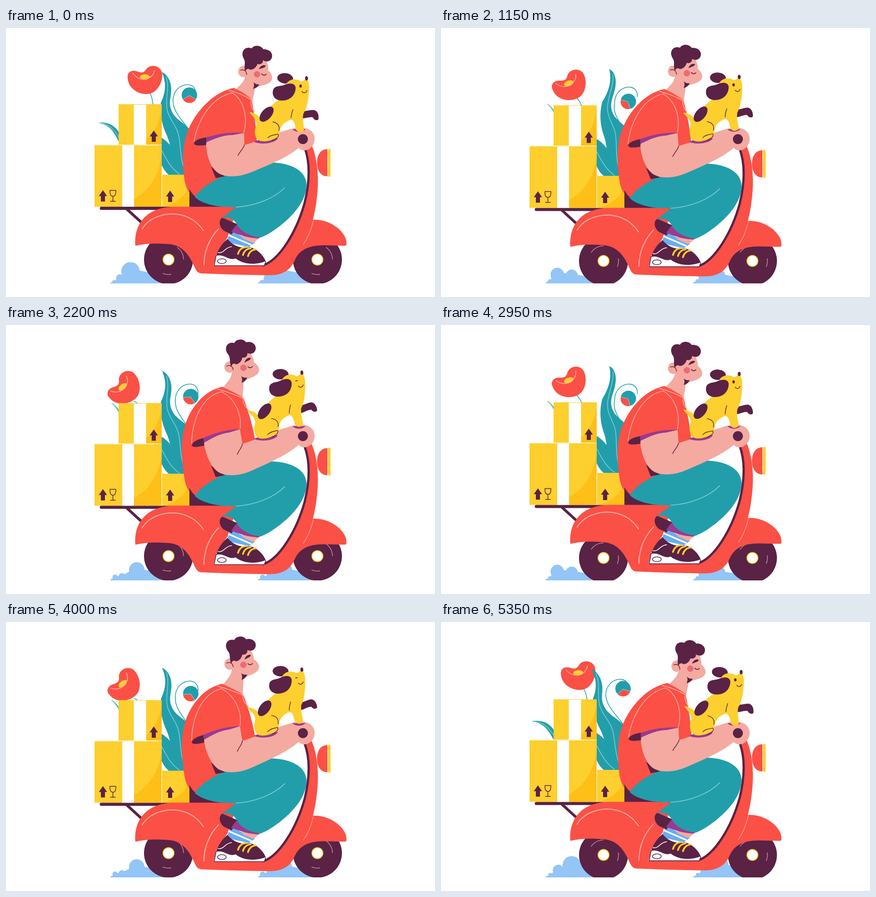
An HTML page with a canvas for the animation above (5.4 s loop, 945x593 px).

```html
<!DOCTYPE html>
<html lang="en">
<head>
<meta charset="utf-8">
<title>Scooter ride</title>
<style>
html, body { margin: 0; width: 100%; height: 100%; overflow: hidden; background: #fff; }
canvas { display: block; width: 945px; height: 593px; }
</style>
</head>
<body>
<canvas id="stage" width="945" height="593"></canvas>
<script>
const ctx = document.getElementById('stage').getContext('2d');
const RED = '#fb5046', PLUM = '#5a2245', SKIN = '#f4aaa0', YELLOW = '#fdcf2f', AMBER = '#fdbf18',
  TEAL = '#229eab', MAGENTA = '#9b3a8e', SKY = '#93c5f7', PINK = '#ffb3a5', AQUA = '#84cbd0', WHITE = '#fff';
const TAU = Math.PI * 2, STEP = 50, GROUND = 563;
const clamp = (v, lo = 0, hi = 1) => Math.max(lo, Math.min(hi, v));
const still = (x, y) => [x, y];

// Builds a path from absolute M, L, C, Q, Z commands, bending every point with warp.
function trace(d, warp = still) {
  ctx.beginPath();
  for (const part of d.match(/[MLCQZ][^MLCQZ]*/g)) {
    const n = (part.slice(1).match(/-?[\d.]+/g) || []).map(Number);
    const p = [];
    for (let i = 0; i < n.length; i += 2) p.push(...warp(n[i], n[i + 1]));
    switch (part[0]) {
      case 'M': ctx.moveTo(...p); break;
      case 'L': ctx.lineTo(...p); break;
      case 'C': ctx.bezierCurveTo(...p); break;
      case 'Q': ctx.quadraticCurveTo(...p); break;
      default: ctx.closePath();
    }
  }
}
function fill(color, d, warp) {
  trace(d, warp);
  ctx.fillStyle = color;
  ctx.fill();
}
function line(color, width, d, warp) {
  trace(d, warp);
  ctx.strokeStyle = color;
  ctx.lineWidth = width;
  ctx.stroke();
}
function oval(color, x, y, rx, ry = rx, turn = 0) {
  ctx.beginPath();
  ctx.ellipse(x, y, rx, ry, turn, 0, TAU);
  ctx.fillStyle = color;
  ctx.fill();
}
function rect(color, x, y, w, h) {
  ctx.fillStyle = color;
  ctx.fillRect(x, y, w, h);
}
function group(dx, dy, draw) {
  ctx.save();
  ctx.translate(dx, dy);
  draw();
  ctx.restore();
}
function spin(x, y, deg, draw) {
  ctx.save();
  ctx.translate(x, y);
  ctx.rotate(deg * Math.PI / 180);
  ctx.translate(-x, -y);
  draw();
  ctx.restore();
}

// Puffs: moment of leaving the wheel within 900 ms, and size.
const PUFFS = [[105, 1.35], [250, 0.65], [400, 0.85], [560, 1], [720, 1], [850, 1]];

function dust(t, dx) {
  const list = [];
  for (const [born, size] of PUFFS) {
    const age = ((t - born + 200) % 900 + 900) % 900 - 200;
    if (age > 560) continue;
    const h = age < 0 ? 47 * Math.exp(age / 150) : age < 50 ? 47 : 47 * Math.exp(-(age - 50) / 155);
    list.push({ x: 226 + 62 * Math.exp(-age / 200), h: h * size });
  }
  list.sort((a, b) => a.x - b.x);
  group(dx, 0, () => {
    ctx.beginPath();
    ctx.rect(150, 400, 250, GROUND - 400);
    ctx.clip();
    ctx.beginPath();
    ctx.moveTo(229, GROUND);
    for (const p of list) ctx.lineTo(p.x, GROUND - p.h * 0.68);
    ctx.lineTo(352, GROUND);
    ctx.fillStyle = SKY;
    ctx.fill();
    for (const p of list) {
      const r = Math.max(1, p.h * 0.43);
      oval(SKY, p.x, GROUND - p.h + r, r);
      rect(SKY, p.x - r * 0.9, GROUND - p.h + r * 1.3, r * 1.8, p.h);
    }
  });
}

function wheel(x, y, deg) {
  ctx.save();
  ctx.beginPath();
  ctx.rect(x - 60, 400, 120, GROUND - 400);
  ctx.clip();
  oval(PLUM, x, y, 54);
  spin(x, y, deg, () => {
    ctx.strokeStyle = '#c58593';
    ctx.lineWidth = 1.6;
    for (const [a, b] of [[-0.95, -0.02], [1.42, 1.95]]) {
      ctx.beginPath();
      ctx.arc(x, y, 33, a, b);
      ctx.stroke();
    }
  });
  oval(YELLOW, x, y, 13);
  oval(WHITE, x, y, 11);
  ctx.restore();
}

function poppy(f) {
  const dx = -43 * f, dy = 21 * f;
  line(TEAL, 1.6, `M${316 + dx * 0.75} ${142 + dy} Q${325 + dx * 0.6} ${154 + dy * 0.8} ${326 + dx * 0.4} 200`);
  group(dx, dy, () => spin(307, 115, -37 * f, () => {
    fill(RED, 'M268 110 C266 97 277 92 287 95 C296 98 302 101 308 92 C316 79 337 81 343 96 C348 113 337 136 322 143 C303 152 269 138 268 110Z');
    oval(YELLOW, 306, 108, 11, 6);
    fill(RED, 'M280 100 C288 113 300 114 308 114 C318 112 324 105 327 94 L335 120 L300 133 L278 118Z');
    line(PINK, 1.6, 'M279 99 C288 112 299 114 308 113 C318 110 325 104 327 94');
  }));
}

function plants(f, th) {
  const s = Math.sin(th), c = Math.cos(th);
  const q = (6.5 * c - 6.5 + 39 * s) / 39;
  const k = (11.5 - 11.5 * c + 16.7 * s) / 28;

  const side = (x, y) => {
    const w = Math.sqrt(clamp((258 - x) / 54));
    return [x + 27 * k * w, y - 42 * k * w];
  };
  fill(TEAL, 'M204 209 C226 206 242 217 250 232 L254 262 C247 250 243 236 232 224 C224 215 214 211 204 209Z', side);
  line(AQUA, 1.5, 'M212 210 C230 214 240 226 250 244', side);

  poppy(f);

  // Bud on its curled stem
  const stem = (x, y) => {
    const w = clamp((230 - y) / 70);
    return [x + 14.7 * s * w, y + 3 * s * w];
  };
  line(TEAL, 1.6, 'M404 226 C386 200 368 184 368 160 C368 138 384 124 402 125 C412 126 419 134 418 146', stem);
  group(8.8 * s, 1 - c + 10.4 * s, () => spin(404, 148, 36 * s + 7 * (1 - c), () => {
    oval(TEAL, 404, 148, 17);
    fill(RED, 'M404 149 L418 157 C412 168 396 168 390 157Z');
    line(AQUA, 1.2, 'M390 157 L404 149 L418 157');
  }));

  // Tall leaf and the low one beside it
  const tall = (x, y) => {
    const w = clamp((330 - y) / 230) ** 2;
    return [x + 35 * q * w, y - 11 * q * w];
  };
  fill(TEAL, 'M343 97 C354 101 364 116 364 135 C364 154 357 164 365 183 C374 204 394 208 406 226 L398 326 L375 326 C362 292 368 268 354 236 C344 215 338 190 341 165 C349 148 356 125 343 97Z', tall);
  line(AQUA, 1.6, 'M353 108 C361 132 350 156 355 181 C360 203 377 216 381 240 C385 264 384 288 393 312', tall);
  fill(TEAL, 'M335 238 C354 247 366 260 375 280 L399 326 L362 326 C350 319 343 304 335 284Z');
  line(AQUA, 1.6, 'M338 262 C349 279 358 306 382 322');
}

function arrow(x, y) {
  fill(PLUM, `M${x} ${y} L${x + 9} ${y + 13} L${x + 4.5} ${y + 13} L${x + 4.5} ${y + 25} L${x - 4.5} ${y + 25} L${x - 4.5} ${y + 13} L${x - 9} ${y + 13}Z`);
}

function cargo() {
  line(PLUM, 7, 'M210 397.5 L420 397.5');
  line(PLUM, 6, 'M267 400 L302 432');
  rect(YELLOW, 248, 168, 95, 89);
  fill(AMBER, 'M343 180 C337 211 325 234 308 246 L308 257 L343 257Z');
  rect(WHITE, 281.5, 169, 27, 88);
  rect(YELLOW, 195, 258.5, 148, 135.5);
  fill(AMBER, 'M343 284 C335 330 312 362 282 377 L282 394 L343 394Z');
  rect(WHITE, 256, 259, 26, 135);
  rect(YELLOW, 344, 323.5, 61.5, 70.5);
  fill(AMBER, 'M405.5 339 C400 365 382 382 356 391 L356 394 L405.5 394Z');
  rect('#fff3c9', 195, 257, 148, 1.5);
  rect('#fff3c9', 342.5, 323, 1.5, 71);
  arrow(325.5, 226);
  arrow(213.5, 357.5);
  arrow(361.5, 358.5);
  line(PLUM, 1.5, 'M229 358 L242 358 C242 366 241 371 235.5 371 C230 371 229 366 229 358Z M235.5 371 L235.5 382 M230 382 L241 382');
}

function head(u, bob) {
  group(-24 * u, bob - 7.5 * u, () => spin(520, 140, -8.4 * u, () => {
    fill(SKIN, 'M526 70 L573 66 C574 78 580 87 577 93 C589 103 590 116 578 122 C569 127 557 127 549 132 L542 165 L520 165 L500 140 C515 127 524 120 527 106Z');
    oval(SKIN, 523, 96, 11.5, 12.5);
    line(PLUM, 1.5, 'M517 93 C525 90 530 96 530 103');
    oval('#ee6a74', 553, 102, 7);
    fill(PLUM, 'M545 119 C548 123 553 125 558 124 C555 130 550 133 544 134 C547 129 547 124 545 119Z');
    line(PLUM, 1.8, 'M563 101 C566 105 570 105 573 102');
    fill(PLUM, 'M557 91 C560 84 566 80 572 83 C572 87 565 88 557 91Z');
    fill(PLUM, 'M527 96 C523 84 529 76 524 68 C515 52 527 39 541 45 C546 37 561 37 567 47 C580 46 590 56 585 67 C581 75 572 75 566 71 C567 78 559 82 554 79 C551 88 544 92 538 92 C533 88 529 90 527 96Z');
  }));
}

function scooter() {
  fill(PLUM, 'M404 355 C410 366 416 373 430 380 L512 390 L510 396 L404 396Z');
  fill(RED, 'M285 480 C281 430 312 394 372 394 L510 394 L488 462 C474 480 463 500 457 524 L570 524 C605 510 640 450 659 384 C670 332 668 290 656 262 L672 255 C688 290 690 340 684 380 C682 398 679 410 676 423 C713 420 752 450 750 476 Q750 480 746 480 L700 479 C665 479 646 490 636 512 C627 533 610 545 582 545 C550 545 480 543 430 541 C420 540 418 532 412 520 C398 490 380 476 352 476 C322 474 305 476 285 480Z');
  line(PLUM, 5, 'M566 523 C602 512 640 450 658 385 C670 335 669 294 658 264');
  line(PINK, 2, 'M300 443 C316 416 352 407 380 411 C408 416 424 430 435 447');
  line(PINK, 2, 'M436 523 C436 492 448 464 468 443');
  line(PINK, 1.2, 'M677 425 C672 446 664 464 655 477');
  fill(RED, 'M708 267 C691 267 685 283 685 297 C685 311 691 327 708 327Z');
  line(YELLOW, 6, 'M712 269 L712 325');
}

function leg() {
  fill('#68aef2', 'M494 447 L549 473 L535 483 L486 472Z');
  line(WHITE, 3.5, 'M491 457 L540 478');
  fill(SKIN, 'M522 456 L558 463 L545 474 L520 463Z');
  fill(WHITE, 'M463 498 L458 524 L569 524 L572 515 L505 506Z');
  fill(PLUM, 'M488 465 C477 474 468 486 463 502 C482 498 490 514 506 508 C524 523 554 522 572 514 C566 499 553 488 538 483 C524 487 502 483 488 465Z');
  line(PLUM, 1.6, 'M463 501 L458.5 524 L569 524 L572 515');
  line(PLUM, 1.5, 'M466 514 C466 507 485 507 485 514 C485 521 466 521 466 514Z');
  line(WHITE, 1.6, 'M467 495 C480 498 482 483 497 482');
  for (let i = 0; i < 3; i++) {
    const x = i * 11, y = i * 2.5;
    line(YELLOW, 3.8, `M${511 + x} ${498 + y} C${513 + x} ${490 + y} ${519 + x} ${484 + y} ${528 + x} ${483 + y}`);
  }
  fill(PLUM, 'M476 418 C468 424 469 438 480 447 L497 455 L511 433Z');
  fill(MAGENTA, 'M507 434 L496 449 C513 456 533 463 556 464 L561 461Z');
  fill(TEAL, 'M416 373 C430 350 460 334 497 318 C520 301 560 294 595 297 C636 301 662 318 662 347 C661 377 640 406 610 431 C592 446 576 456 561 462 C536 459 516 448 508 432 C500 418 486 415 474 420 L507 395 C478 396 438 392 416 373Z');
  line(AQUA, 1.7, 'M507 395 C550 392 590 376 614 352');
}

function torso(u, bob) {
  return (x, y) => {
    const w = clamp((300 - y) / 160, 0, 1.05) ** 1.3 * clamp((620 - x) / 90);
    return [x - 24 * u * w, y + bob * clamp((640 - x) / 120)];
  };
}

function shirt(warp) {
  fill(RED, 'M502 132 C460 140 420 180 401 225 C387 262 388 300 394 340 C398 358 406 367 416 373 L460 375 L500 330 L553 258 C552 222 547 190 541 157 C530 146 515 139 502 132Z', warp);
  line(PINK, 1.5, 'M490 137 C510 142 529 151 540 158', warp);
  line(PINK, 1.5, 'M540 158 C538 168 541 176 547 184', warp);
}

function arm(warp, u) {
  // The sleeve's hem tips as the body leans back.
  const sleeve = (x, y) => {
    const [a, b] = warp(x, y);
    return [a, b - 0.12 * u * (x - 470) * clamp((y - 140) / 100)];
  };
  fill(PLUM, 'M452 306 L482 327 L462 331Z', warp);
  fill(SKIN, 'M441 230 C438 270 446 302 465 318 C482 331 514 329 540 318 C584 300 622 284 645 264 C650 271 660 271 667 267 C683 258 684 236 671 226 C657 216 638 219 619 225 C590 233 560 248 525 258 L524 216Z', warp);
  fill(RED, 'M498 143 C455 152 424 198 414 254 C420 245 432 243 441 241 C470 232 500 230 526 231 C533 196 522 158 498 143Z', sleeve);
  fill(PLUM, 'M414 254 C417 246 429 243 442 241 L441 258 C430 259 415 261 414 254Z', sleeve);
  fill(MAGENTA, 'M441 241 C470 232 498 229 526 231 L499 236 C478 236 462 243 441 252Z', sleeve);
  line(PINK, 1.5, 'M498 143 C455 152 424 198 414 250', sleeve);
  line(PINK, 1.5, 'M498 143 C521 156 534 192 524 230', sleeve);
  line(PLUM, 1.5, 'M525 258 C522 268 515 272 511 281', warp);
  fill(MAGENTA, 'M546 251 C562 258 592 255 599 243 L560 245Z');
  fill(MAGENTA, 'M631 223 C637 230 652 231 660 223Z');
  oval(PLUM, 654, 245, 11);
}

function dog(lean, blink) {
  spin(575, 250, -4 * lean, () => {
    spin(655, 190, -8 * lean, () =>
      fill(PLUM, 'M650 182 C662 185 668 180 679 181 C688 183 690 196 688 202 C683 205 678 202 676 197 C668 195 660 200 650 199Z'));
    oval(PLUM, 615, 111, 17.5, 11.5, 0.1);
    fill(YELLOW, 'M552 212 C550 198 543 196 536 185 C550 187 558 194 562 202Z');
    fill(YELLOW, 'M549 235 C546 223 554 203 566 190 C576 176 590 167 601 158 C606 150 609 134 618 122 C627 110 642 112 650 118 C655 118 658 112 662 112 C668 118 669 130 667 145 C665 165 661 180 655 189 C652 202 657 215 656 226 C650 232 641 230 638 222 C636 206 632 201 625 203 C613 208 604 215 603 230 C600 243 588 248 570 250 C556 250 550 245 549 235Z');
    oval(PLUM, 574, 190, 20, 11, -0.85);
    fill(PLUM, 'M614 125 C625 121 636 121 638 131 C638 148 626 160 608 160 C592 160 584 148 589 135 C594 126 606 129 614 125Z');
    oval(PLUM, 662, 111, 3.2, 4.8);
    oval(PLUM, 649, 128, 2.7, blink ? 0.9 : 3.4);
    line(PLUM, 1.4, 'M652 140 C656 145 661 143 663 138');
    line(PLUM, 1.4, 'M628 198 C628 191 630 186 632 180');
    line(PLUM, 1.4, 'M588 207 C598 209 604 216 601 226');
    line(PLUM, 1.4, 'M577 242 C583 235 592 236 599 234 C603 240 594 245 586 248');
  });
}

function render(t) {
  const th = TAU * t / 900, ph = TAU * t / 300;
  const u = 0.566 - 0.566 * Math.cos(th) - 0.284 * Math.sin(th);
  const lean = 0.56 - 0.56 * Math.cos(th) - 0.14 * Math.sin(th);
  const bob = 3.35 - 3.35 * Math.cos(ph) - 0.84 * Math.sin(ph);
  const axle = 511.5 - Math.cos(ph) - 2.9 * Math.sin(ph);
  const turn = t / STEP * 90 % 360;
  const warp = torso(u, bob);
  const blink = t % 900 >= 350 && t % 900 < 500;

  rect(WHITE, 0, 0, 945, 593);
  ctx.lineCap = ctx.lineJoin = 'round';
  dust(t, 0);
  dust(t, 325);
  wheel(358, axle, turn);
  wheel(686, axle, turn);
  group(0, bob, () => {
    plants(lean, th);
    cargo();
  });
  head(u, bob);
  shirt(warp);
  group(0, bob, () => {
    scooter();
    leg();
  });
  arm(warp, u);
  dog(lean, blink);
}

const start = performance.now();
function tick(now) {
  const t = Math.max(0, now - start) % 5400;
  render(Math.floor(t / STEP) * STEP);
  requestAnimationFrame(tick);
}
render(0);
requestAnimationFrame(tick);
</script>
</body>
</html>
```
